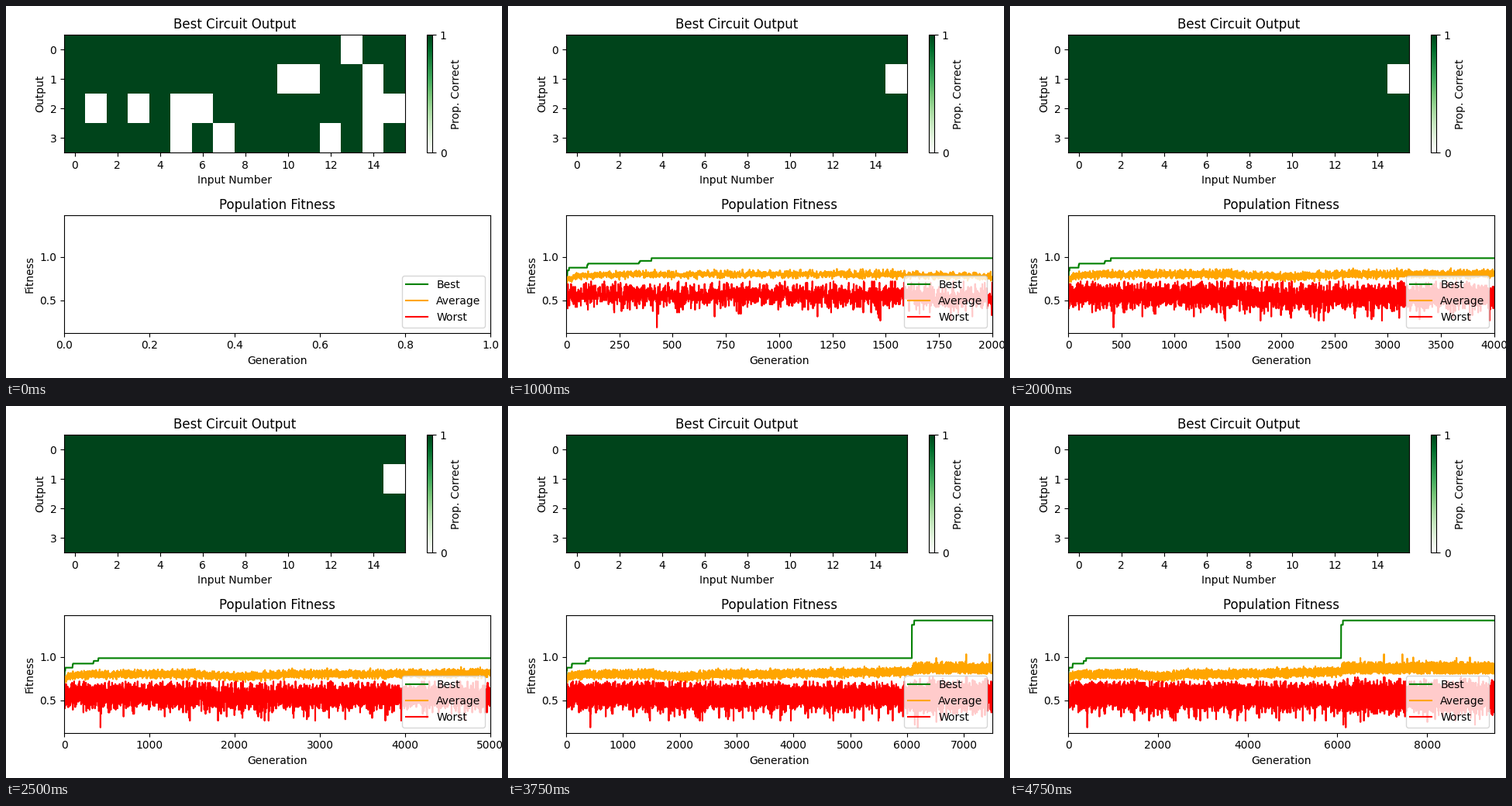
A matplotlib script for the animation above (5000 ms loop, 640 by 480 pixels).

```python
import numpy as np
import matplotlib.pyplot as plt
from matplotlib.animation import FuncAnimation
from matplotlib.colors import LinearSegmentedColormap

FRAMES, STEP = 20, 500
GENS = (FRAMES - 1) * STEP + 1
CELLS = 64
SOLVED = 6084        # generation at which every cell becomes correct
LOW, HIGH = 0.1875, 1.4175

rng = np.random.default_rng(7)
gen = np.arange(GENS)
late = gen > SOLVED + 15


def best_curve():
    """Staircase of correct cells, then a bonus once all are correct."""
    starts = [6, 14, 99, 103, 342, 347, 401]
    correct = np.array([50, 54, 56, 58, 59, 60, 61, 63])
    y = correct[np.searchsorted(starts, gen, side="right")] / CELLS
    y[gen >= SOLVED] = HIGH - 0.05
    y[gen >= SOLVED + 41] = HIGH
    return y


def average_curve():
    """Quick rise, a shallow dip near 2000, a slow climb, a late step."""
    y = 0.80 - 0.045 * np.exp(-gen / 90) - 0.07 * np.exp(-gen / 5)
    y -= 0.03 * np.exp(-((gen - 2050) / 350) ** 2)
    y += 0.03 * np.clip((gen - 3500) / 2600, 0, 1) + 0.04 * late
    y += np.clip(rng.normal(0, 0.022 + 0.009 * late), -0.065, 0.07)
    spikes = (rng.random(GENS) < 0.03) * rng.exponential(0.03, GENS)
    return np.minimum(y + spikes * late, 1.03)


def worst_curve():
    """Noise with a hard ceiling and occasional deep drops."""
    y = 0.55 + 0.02 * np.exp(-gen / 1000)
    y -= 0.02 * np.exp(-((gen - 2050) / 300) ** 2)
    y += rng.normal(0, 0.067 + 0.013 * late)
    y -= (rng.random(GENS) < 0.1) * rng.exponential(0.055, GENS)
    y = np.clip(y, 0.27 - 0.05 * late, 0.72 + 0.04 * late)
    y[[426, SOLVED + 104]] = LOW
    return np.round(y * CELLS) / CELLS


def circuit(wrong):
    grid = np.ones((4, 16))
    for row, cols in wrong.items():
        grid[row, cols] = 0
    return grid


first = circuit({0: [13], 1: [10, 11, 14], 2: [1, 3, 5, 6, 14, 15],
                 3: [5, 7, 12, 14]})
nearly = circuit({1: [15]})
solved = circuit({})

shades = plt.cm.Greens(np.linspace(0, 1, 9))
shades[0] = 1
greens = LinearSegmentedColormap.from_list("white_greens", shades)

fig, (grid_ax, fit_ax) = plt.subplots(2, 1, figsize=(6.4, 4.8), dpi=100)

image = grid_ax.imshow(first, cmap=greens, vmin=0, vmax=1, aspect="auto",
                       interpolation="nearest")
grid_ax.set(title="Best Circuit Output", xlabel="Input Number",
            ylabel="Output")
bar = fig.colorbar(image, ax=grid_ax, ticks=[0, 1])
bar.ax.set_yticklabels(["0", "1"])
bar.set_label("Prop. Correct")

curves = [(best_curve(), "green", "Best"),
          (average_curve(), "orange", "Average"),
          (worst_curve(), "red", "Worst")]
lines = [fit_ax.plot([], [], color=color, label=label)[0]
         for _, color, label in curves]
margin = 0.05 * (HIGH - LOW)
fit_ax.set(title="Population Fitness", xlabel="Generation", ylabel="Fitness",
           ylim=(LOW - margin, HIGH + margin))
fit_ax.legend(loc="lower right")
fig.tight_layout()


def update(frame):
    count = frame * STEP + 1
    if frame == 0:
        image.set_data(first)
    else:
        image.set_data(nearly if count <= SOLVED else solved)
    for line, (values, _, _) in zip(lines, curves):
        line.set_data(gen[:count], values[:count])
    fit_ax.set_xlim(0, count)
    return [image, *lines]


anim = FuncAnimation(fig, update, frames=FRAMES, interval=250,
                     repeat=True, repeat_delay=0, blit=False)
plt.show()
```
